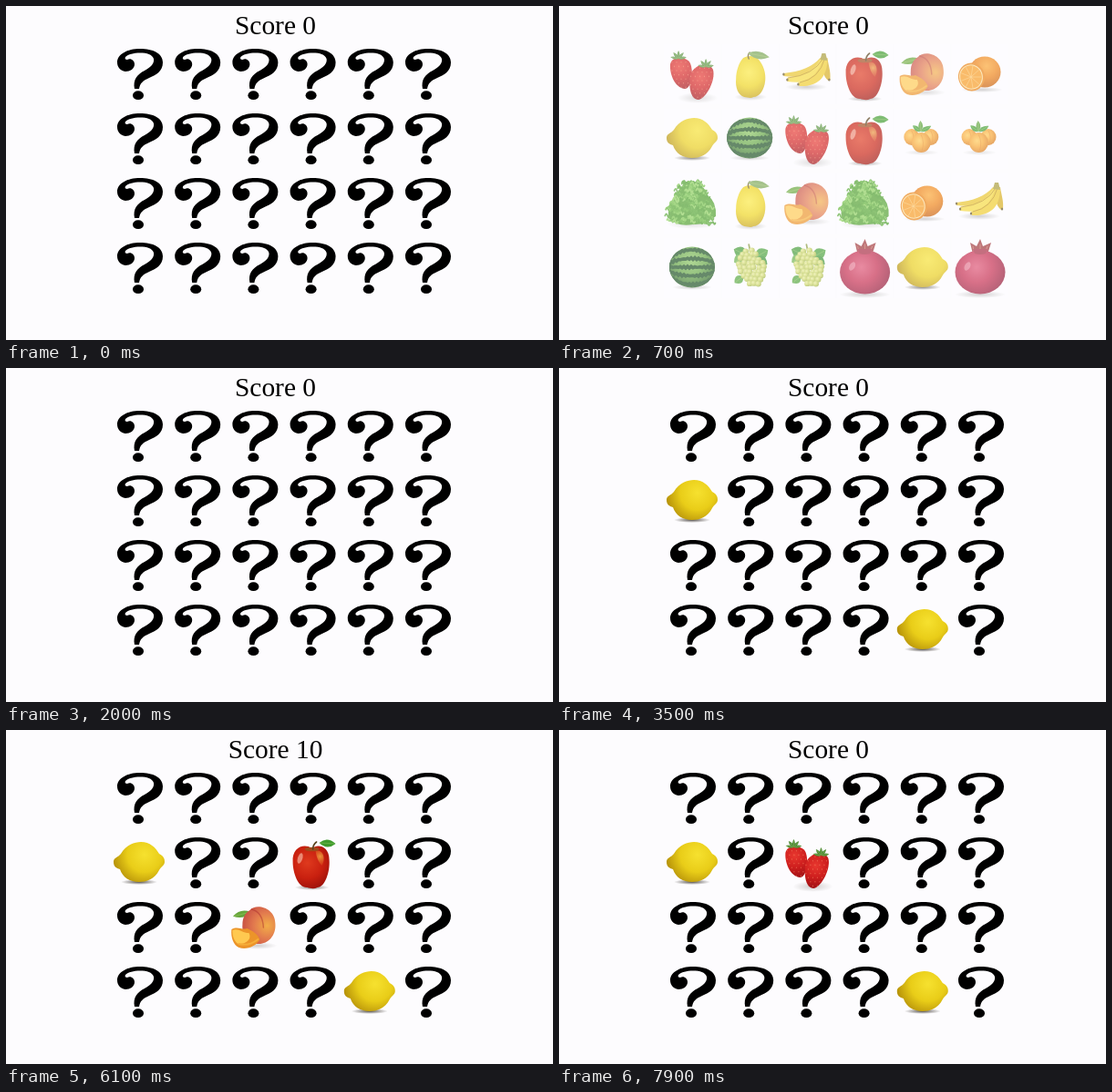
An HTML page with a canvas for the animation above (8000 ms loop, 600 px wide and 367 px high).

```html
<!DOCTYPE html>
<html lang="en">
<head>
<meta charset="utf-8">
<title>Fruit memory</title>
<style>
html, body { margin: 0; width: 100%; height: 100%; overflow: hidden; background: #fdfcfe; }
canvas { display: block; }
</style>
</head>
<body>
<canvas id="stage" width="600" height="367"></canvas>
<script>
const ctx = document.getElementById('stage').getContext('2d');
const LOOP = 8000;
const PAPER = '#fdfcfe';
const COLS = 6;
const CELL = 60;

function fill(path, color) {
  ctx.fillStyle = color;
  ctx.fill(new Path2D(path));
}

function line(path, color, width) {
  ctx.strokeStyle = color;
  ctx.lineWidth = width;
  ctx.lineCap = 'round';
  ctx.stroke(new Path2D(path));
}

function oval(x, y, rx, ry, color, turn = 0) {
  ctx.fillStyle = color;
  ctx.beginPath();
  ctx.ellipse(x, y, rx, ry, turn, 0, Math.PI * 2);
  ctx.fill();
}

function glow(x, y, r, ...colors) {
  const g = ctx.createRadialGradient(x, y, 0, x, y, r);
  colors.forEach((c, i) => g.addColorStop(i / (colors.length - 1), c));
  return g;
}

function shadow(x, y, rx, ry, strength = 0.35) {
  ctx.save();
  ctx.translate(x, y);
  ctx.scale(1, ry / rx);
  oval(0, 0, rx, rx, glow(0, 0, rx, `rgba(70,65,60,${strength})`, 'rgba(70,65,60,0)'));
  ctx.restore();
}

function leaf(x, y, length, width, turn, color = '#3f9b2d') {
  ctx.save();
  ctx.translate(x, y);
  ctx.rotate(turn);
  fill(`M0,0 Q${length * 0.45},${-width} ${length},0 Q${length * 0.5},${width} 0,0Z`, color);
  line(`M1,0 L${length - 2},0`, 'rgba(190,220,120,.5)', 0.6);
  ctx.restore();
}

function random(seed) {
  return () => (seed = (seed * 16807) % 2147483647) / 2147483647;
}

function berry(path, x, y, top) {
  const shape = new Path2D(path);
  ctx.save();
  ctx.fillStyle = glow(x - 2, y - 4, 25, '#e8382f', '#cf1f1e', '#a01115');
  ctx.fill(shape);
  ctx.clip(shape);
  for (let j = -4; j < 5; j++) {
    for (let i = -3; i < 4; i++) {
      oval(x + i * 5 + (j & 1) * 2.5, y + j * 4.6, 0.6, 0.8, 'rgba(245,130,95,.6)');
    }
  }
  ctx.restore();
  for (let i = 0; i < 5; i++) leaf(x + top.dx, y + top.dy, 9, 3, -0.2 - i * 0.68, '#4c8936');
}

const draw = {
  strawberry() {
    shadow(36, 56, 22, 6, 0.25);
    berry('M6,19C8,9 24,10 28,18C32,28 29,46 22,46C13,46 5,32 6,19Z', 18, 26, { dx: -3, dy: -13 });
    berry('M28,31C32,18 49,16 53,25C56,36 46,56 37,58C28,58 26,43 28,31Z', 41, 37, { dx: 4, dy: -15 });
  },

  lemon() {
    shadow(30, 51, 20, 3, 0.9);
    fill('M2,29C2,24 7,24 10,20C16,10 25,7 32,7C42,7 48,13 52,20C57,23 58,25 58,29C58,33 54,34 52,38C47,48 38,51 30,51C20,51 12,46 9,37C5,36 2,34 2,29Z',
      glow(36, 21, 38, '#f6e12f', '#e9cd18', '#ad8706'));
  },

  quince() {
    shadow(31, 55, 18, 4);
    fill('M23,12C28,9 36,9 40,14C45,20 48,29 47,37C46,47 41,55 34,55C31,57 27,55 24,55C17,53 14,44 15,35C15,27 18,17 23,12Z',
      glow(29, 28, 31, '#fbe93f', '#eed41b', '#bf990b'));
    line('M29,13 Q27,9 30,6', '#6b5a25', 1.4);
    leaf(28, 7, 24, 8, 0.18, '#79a552');
  },

  banana() {
    shadow(29, 44, 23, 4);
    fill('M44,12C36,22 22,27 4,29L4,32C24,35 42,29 50,13Z', '#e9c428');
    fill('M46,12C46,24 47,32 53,37L55,36C56,27 53,20 52,12Z', '#d8ad1c');
    fill('M45,12C38,27 24,32 8,34L8,38C28,41 47,36 51,13Z', '#f5d93c');
    fill('M46,12C44,28 34,36 20,39L21,43C40,44 52,35 52,13Z', '#efcb2a');
    line('M9,34 Q37,31 47,13 M22,39 Q43,35 49,13', '#b98c14', 0.9);
    fill('M44,14L46,7L50,7L52,15Z', '#a89a35');
    for (const [x, y] of [[4, 30], [8, 36], [20, 41], [54, 36]]) oval(x, y, 1.2, 1.5, '#665322');
  },

  apple() {
    shadow(30, 57, 19, 3, 0.6);
    fill('M30,14C36,9 49,11 49,27C50,40 44,57 36,57C32,59 28,58 25,57C15,58 9,41 9,29C8,13 21,8 30,14Z',
      glow(25, 30, 34, '#df3a1e', '#c9200f', '#8e0c08'));
    fill('M34,17C41,14 46,24 41,33C37,29 35,24 34,17Z', glow(39, 23, 11, 'rgba(245,190,75,.75)', 'rgba(230,100,35,.2)'));
    oval(17, 25, 2.6, 6, 'rgba(255,215,195,.55)', 0.3);
    oval(30, 15, 8, 2.3, '#a04a1b');
    line('M31,15 Q31,10 35,7', '#59421d', 1.6);
    leaf(38, 8, 18, 8, 0.05);
  },

  peach() {
    shadow(33, 50, 22, 4, 0.25);
    leaf(26, 13, 20, 7, 2.9, '#67a63b');
    fill('M25,11C32,3 53,8 53,26C54,39 45,48 35,48C24,48 16,38 17,27C17,19 20,14 25,11Z',
      glow(44, 28, 29, '#f2ad48', '#e27a4e', '#c64d43'));
    line('M27,10 Q39,13 40,30', 'rgba(175,50,45,.5)', 1.4);
    fill('M5,32C12,28 16,33 22,31C29,34 34,38 36,43C32,51 21,55 13,52C7,49 4,41 5,32Z', '#ec9429');
    fill('M6,33C12,30 17,36 24,36C28,43 20,49 12,48C7,44 6,39 6,33Z', '#ffc950');
    line('M13,48 Q24,51 34,43', '#f5ad38', 2);
  },

  orange() {
    shadow(32, 47, 23, 3);
    oval(35, 27.5, 17.5, 17, glow(37, 21, 24, '#fba530', '#ee8112', '#c65c05'));
    oval(20.5, 33, 14.5, 15.5, '#ea8110', -0.25);
    oval(20, 33, 12.9, 13.8, '#fbdc9c', -0.25);
    oval(20, 33, 11.8, 12.7, '#f79a1f', -0.25);
    for (let i = 0; i < 9; i++) {
      const a = i * Math.PI * 2 / 9;
      line(`M20,33 L${20 + 11 * Math.cos(a)},${33 + 12 * Math.sin(a)}`, '#fcc469', 0.7);
    }
  },

  watermelon() {
    shadow(30, 51, 22, 3);
    const rind = new Path2D();
    rind.ellipse(30, 29, 25, 22.5, 0, 0, Math.PI * 2);
    ctx.save();
    ctx.fillStyle = glow(29, 22, 31, '#8cc860', '#62a541', '#245c20');
    ctx.fill(rind);
    ctx.clip(rind);
    for (let i = -2; i <= 2; i++) {
      let path = 'M3,29';
      for (let x = 5; x <= 57; x += 2) {
        const bend = Math.sqrt(Math.max(0, 1 - ((x - 30) / 28) ** 2));
        path += `L${x},${29 + i * 9.5 * bend + Math.sin(x * 1.7 + i)}`;
      }
      line(path, '#1b4f1f', 3.6);
    }
    ctx.restore();
  },

  apricot() {
    shadow(29, 45, 19, 3, 0.2);
    for (const [x, y, r] of [[18, 28, 8.5], [39, 28, 8.5], [28.5, 34, 10.5]]) {
      oval(x, y, r, r * 1.05, glow(x - 2, y - 2, r * 1.3, '#ffca55', '#f8a630', '#dc7c18'));
      line(`M${x},${y - r * 0.8} Q${x + 4},${y} ${x + 1},${y + r * 0.8}`, 'rgba(221,120,20,.45)', 1);
    }
    leaf(28, 22, 11, 5, -2.5);
    leaf(28, 22, 13, 5, -0.5);
    leaf(28, 22, 12, 5, -1.6, '#579f35');
  },

  lettuce() {
    const rnd = random(83);
    const greens = ['#4a9c28', '#62b338', '#79c44b', '#8ccf5b', '#55a631'];
    shadow(30, 53, 27, 5, 0.2);
    fill('M18,12Q26,2 36,7Q44,13 47,21Q57,28 56,44Q45,54 31,53Q14,56 4,46Q3,34 9,25Z', '#4f9f2c');
    for (let i = 0; i < 170; i++) {
      const y = 6 + rnd() * 46;
      const half = Math.min(26, 7 + y * 0.55);
      const x = 29 + (rnd() * 2 - 1) * half;
      const r = 1.5 + rnd() * 1.6;
      line(`M${x - r},${y} q${r * 0.5},${-r * 1.5} ${r},0 t${r},0`, greens[i % 5], 1.7);
    }
  },

  grapes() {
    const rnd = random(29);
    leaf(27, 16, 16, 12, -2.7, '#459b38');
    leaf(24, 17, 13, 11, 2.6, '#69b148');
    leaf(36, 18, 16, 12, -0.5, '#4ba23c');
    leaf(37, 19, 14, 11, 0.5, '#3c9335');
    leaf(23, 39, 12, 9, 2.5, '#55a63d');
    line('M31,14 L29,4', '#8a9a3d', 1.7);
    for (let row = 0; row < 9; row++) {
      const count = [2, 4, 5, 6, 6, 6, 5, 4, 3][row];
      for (let i = 0; i < count; i++) {
        const x = 29 + row * 0.8 + (i - (count - 1) / 2) * 5 + rnd() * 2 - 1;
        const y = 11 + row * 4.5 + rnd() * 2 - 1;
        oval(x, y, 3.2, 3.2, glow(x - 1, y - 1, 4.4, '#e9ec9c', '#cbd566', '#a2b444'));
      }
    }
  },

  pomegranate() {
    shadow(30, 59, 28, 4, 0.35);
    fill('M22,15L19,2L26,6L30,-2L33,6L42,2L38,15Z', '#9f3438');
    line('M23,11L22,6 M30,11V4 M36,11L38,6', '#c96a5c', 1);
    oval(30, 34.5, 27.5, 24, glow(26, 29, 34, '#de5272', '#c52a4c', '#8f1433'));
    fill('M22,9L38,9L36,14Q30,16 24,14Z', '#a8293f');
    oval(16, 28, 3, 5, 'rgba(255,205,215,.4)', 0.5);
  },

  question() {
    ctx.translate(6, 2);
    fill('M19,44C17,34 22,28 30,24C37,20 41,16 40,11C38,6 33,4.5 25,4.5C18,4.5 12,6 9,9C8,11 9,12 11,12C15,10 19,13 19,17C19,22 14,25 9,25C3,24 0,20 0,15C0,6 11,0 25,0C39,0 50,5 50,15C50,25 42,29 35,32C28,35 25,38 24,44Z', '#000');
    oval(23, 51.2, 6, 4.9, '#000');
  }
};

const board = [
  'strawberry quince banana apple peach orange',
  'lemon watermelon strawberry apple apricot apricot',
  'lettuce quince peach lettuce orange banana',
  'watermelon grapes grapes pomegranate lemon pomegranate'
].join(' ').split(' ');

// Each pick is face up from start to end; soft ones fade in over one tick.
const picks = [
  { cell: 6, start: 2700, end: LOOP, soft: true },
  { cell: 22, start: 3400, end: LOOP, soft: true },
  { cell: 9, start: 5500, end: 7100 },
  { cell: 14, start: 6100, end: 7100 },
  { cell: 8, start: 7500, end: LOOP, soft: true }
];

function faceAlpha(cell, t) {
  if (t >= 500 && t < 2000) return Math.min(1, Math.floor((t - 500) / 100) / 3);
  const pick = picks.find(p => p.cell === cell && t >= p.start && t < p.end);
  if (!pick) return null;
  return pick.soft && t < pick.start + 100 ? 0.5 : 1;
}

function drawCell(cell, t) {
  const alpha = faceAlpha(cell, t);
  if (alpha === 0) return;
  ctx.save();
  ctx.translate(116 + (cell % COLS) * 63.2, 45 + Math.floor(cell / COLS) * 71);
  draw[alpha === null ? 'question' : board[cell]]();
  if (alpha !== null && alpha < 1) {
    ctx.globalAlpha = 1 - alpha;
    ctx.fillStyle = PAPER;
    ctx.fillRect(-1, -3, CELL + 2, CELL + 6);
  }
  ctx.restore();
}

function render(now) {
  const t = now % LOOP;
  ctx.fillStyle = PAPER;
  ctx.fillRect(0, 0, 600, 367);
  board.forEach((_, cell) => drawCell(cell, t));
  ctx.fillStyle = '#000';
  ctx.font = '29.4px "Liberation Serif", serif';
  ctx.textAlign = 'center';
  ctx.fillText(`Score ${t >= 4500 && t < 7100 ? 10 : 0}`, 295.5, 31);
}

const began = performance.now();
function tick() {
  render(performance.now() - began);
  requestAnimationFrame(tick);
}
tick();
</script>
</body>
</html>
```
